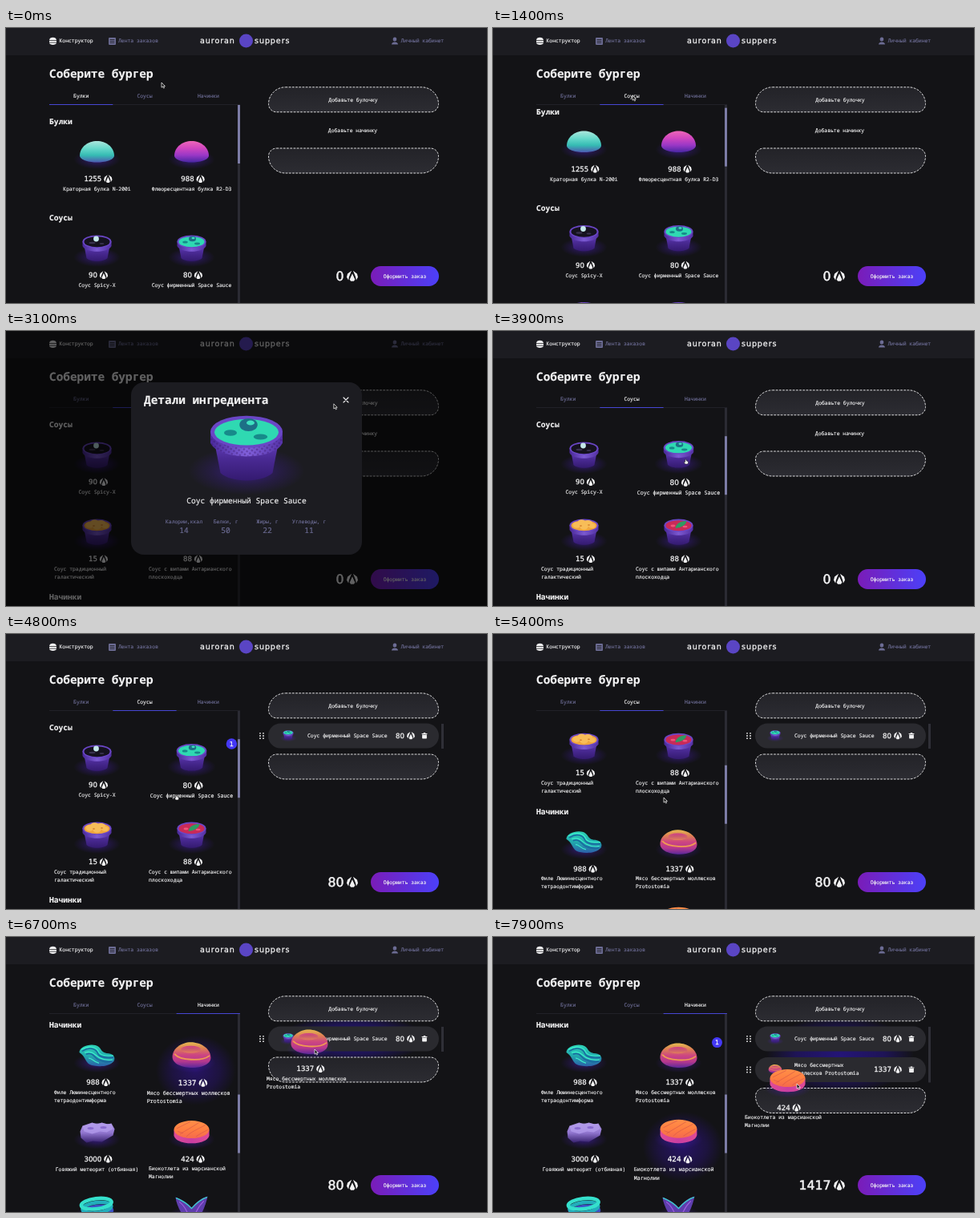
Animation, 600 px wide and 343 px high, one loop 8 s. Source, as an HTML page:

```html
<!DOCTYPE html>
<html lang="ru">
<head>
<meta charset="utf-8">
<title>Конструктор</title>
<style>
html, body { margin: 0; width: 100%; height: 100%; overflow: hidden; background: #131316; }
svg { display: block; width: 100%; height: 100%; }
text {
  font-family: "Noto Sans Mono", "DejaVu Sans Mono", monospace; text-rendering: geometricPrecision; white-space: pre;
  fill: currentColor; stroke: currentColor; stroke-width: .16px;
}
.num, .brand { font-family: "DejaVu Sans", sans-serif; }
.num { stroke-width: .035em; }
.brand { letter-spacing: .9px; stroke-width: .3px; }
</style>
</head>
<body>
<svg id="stage" viewBox="0 0 600 343" preserveAspectRatio="none"></svg>
<script>
const LOOP = 8000, STEP = 100;
const WHITE = '#f2f2f3', MUTED = '#6c6c94';

// ---- markup helpers ----
const text = (x, mid, str, o = {}) => {
  const size = o.size || 6.4;
  return `<text x="${x}" y="${mid + size * .35}" font-size="${size}" color="${o.color || WHITE}"
    text-anchor="${o.anchor || 'start'}" font-weight="${o.weight || 400}" ${o.attr || ''}>${str}</text>`;
};
const num = (x, mid, str, size = 8.6, attr = '') =>
  `<text class="num" x="${x}" y="${mid + size * .365}" font-size="${size}" color="${WHITE}" text-anchor="end" ${attr}>${str}</text>`;
const group = (x, y, inner, scale = 1) => `<g transform="translate(${x} ${y}) scale(${scale})">${inner}</g>`;
const oval = (x, y, rx, ry, fill, attr = '') => `<ellipse cx="${x}" cy="${y}" rx="${rx}" ry="${ry}" fill="${fill}" ${attr}/>`;
const shape = (d, fill, attr = '') => `<path d="${d}" fill="${fill}" ${attr}/>`;
const line = (d, stroke, width) => `<path d="${d}" fill="none" stroke="${stroke}" stroke-width="${width}" stroke-linecap="round"/>`;
const rect = (x, y, w, h, fill, attr = '') => `<rect x="${x}" y="${y}" width="${w}" height="${h}" fill="${fill}" ${attr}/>`;
const stops = colors => colors.map((c, i) => `<stop offset="${i / (colors.length - 1)}" stop-color="${c}"/>`).join('');
const linear = (id, colors, across) =>
  `<linearGradient id="${id}" x2="${across ? 1 : 0}" y2="${across ? 0 : 1}">${stops(colors)}</linearGradient>`;
const halo = (id, color, a, b) => `<radialGradient id="${id}"><stop offset="0" stop-color="${color}" stop-opacity="${a}"/>
  <stop offset=".6" stop-color="${color}" stop-opacity="${b}"/><stop offset="1" stop-color="${color}" stop-opacity="0"/></radialGradient>`;

const defs = `<defs>
  ${linear('mint', ['#b8fbe8', '#6eeed6', '#35cdbb', '#4f62b8'])}
  ${linear('pink', ['#ff6fc0', '#e04bc8', '#a33bd0', '#4a28a8'])}
  ${linear('pot', ['#6a43c6', '#4a2a94', '#341a70'])}
  ${linear('rim', ['#4a2a9c', '#8160dc', '#5533a8'], true)}
  ${linear('teal', ['#2ce6c0', '#1fb8b4', '#2a68b0'])}
  ${linear('meat', ['#f5c84e', '#ee8a52', '#dc4a84', '#c23c92', '#5e2aa0'])}
  ${linear('dimple', ['#c83c86', '#f08a58'])}
  ${linear('stone', ['#b9a2ee', '#9a80da', '#36226e'])}
  ${linear('cutlet', ['#ff8f48', '#ff7f42', '#f5694e'])}
  ${linear('crust', ['#f0509a', '#d842a8', '#f0509a'], true)}
  ${linear('button', ['#7a1cb8', '#4c40f8'], true)}
  ${linear('slot', ['#232328', '#2c2c32'])}
  ${halo('shade', '#4b1fc0', .6, .2)}
  ${halo('source', '#3a14b4', .5, .26)}
  ${halo('drop', '#3216c8', .55, .36)}
  <pattern id="dots" width="1.8" height="1.8" patternUnits="userSpaceOnUse" patternTransform="rotate(35)">
    <circle cx=".9" cy=".9" r=".5" fill="#3a1466" fill-opacity=".42"/></pattern>
  <clipPath id="listArea"><rect y="97" width="300" height="246"/></clipPath>
</defs>`;

// ---- food pictures, centred on 0,0 ----
const floor = (y = 9) => oval(0, y, 29, 12, 'url(#shade)');
const solid = (d, fill) => shape(d, fill) + shape(d, 'url(#dots)');
const bun = fill => floor() + solid('M-21.5 4C-21-7-11-14 0-14S21-7 21.5 4C21.5 10 9 12.5 0 12.5S-21.5 10-21.5 4Z', fill);
const pot = (fill, extra) => floor(11) +
  shape('M-16.5-6L-13 12C-8 17 8 17 13 12L16.5-6Z', 'url(#pot)') +
  solid('M-18-9V-3C-14 6 14 6 18-3V-9Z', 'url(#rim)') +
  oval(0, -8.5, 18, 8, '#6a46c6') + oval(0, -8.3, 16, 6.5, fill) + extra;

const art = {
  mintBun: bun('url(#mint)'),
  pinkBun: bun('url(#pink)'),
  spicy: pot('#15121f', oval(-6, -7, 4, 1.2, '#39324e') + oval(6, -6, 3, 1, '#39324e') + oval(-1, -12, 3.4, 3.4, '#c4e8ea')),
  space: pot('#2fd9b2', oval(-8, -8, 3.2, 1.5, '#178a8a') + oval(7, -6, 3.5, 1.4, '#178a8a') +
    oval(1, -12, 4.5, 3.2, '#1d6f86') + oval(2, -13, 2, 1.2, '#3fe0c0')),
  classic: pot('#f0a63c', [[-9, -9, 5], [-3, -12, 5], [5, -11, 5.5], [10, -8, 4], [0, -7, 5]]
    .map(([x, y, r]) => oval(x, y, r, r * .75, '#f8bd58')).join('') + oval(-4, -8, 1.5, .8, '#d07a2c') + oval(6, -9, 1.5, .8, '#d07a2c')),
  spiky: pot('#c92a58', oval(-7, -8, 3, 1.4, '#f0567a') + oval(8, -7, 3, 1.3, '#f0567a') +
    shape('M-4-5C-3-12 4-14 10-14C9-9 4-6-4-5Z', '#2f9a62')),
  fillet: floor() + solid('M-22-4C-22-11-10-15-2-13C6-11 4-4 12-3C19-3 24 1 21 7C14 15-2 14-9 11C-15 8-14 1-22-4Z', 'url(#teal)') +
    line('M-18-6C-8-12-1-8 1-3S12 3 20 2M-13-2C-5-5-3 3 2 5S12 9 18 7', '#1a6aa0', 1.6) +
    line('M-19-8C-8-14 0-10 2-5S12 0 20 0M-15-4C-5-7-2 0 3 2.5S12 6 19 5M-10 3C-6 3-4 8 2 9', '#3cf0cc', 1.2),
  ring: floor() + solid('M-23 2C-23-8-12-15.5-1-15.5C12-15.5 23-7 23 3C23 11 12 15 1 15S-23 11-23 2Z', 'url(#meat)') +
    oval(-1, -7, 12, 4.2, 'url(#dimple)') + line('M-20-1C-14 6 12 8 21 1', '#f09a52', 1.8) +
    shape('M-13-6C-9-2 7-2 11-6C8-10-10-10-13-6Z', 'url(#dots)'),
  stone: floor() + solid('M-21-1L-18-8L-12-10L-6-12L0-10L6-12L13-10L18-11L22-4L20 4L13 8L6 12L-5 11L-13 13L-20 7Z', 'url(#stone)') +
    shape('M-18-7L-6-11L6-11L18-10L20-4L12 0L4-1L-6 2L-16-1Z', '#b39cec', 'opacity=".75"') +
    oval(-8, -5, 4, 1.6, '#8a6cd0') + oval(8, -6, 4, 1.5, '#8a6cd0'),
  cutlet: floor() + solid('M-22-3V4C-20 17 20 17 22 4V-3Z', 'url(#crust)') + oval(0, -3.5, 22, 11, 'url(#cutlet)') +
    line('M-18-5L-2-13M-14 2C-8-2 0-6 9-12M-6 5C-2 0 8-4 17-9M6 5C10 2 16-1 20-3M-17-1L-11 1', '#d95a48', .7),
  hoops: floor() + `<g fill="none" stroke-width="4.6" transform="rotate(-7)">${[['#3c50c4', 4, 18], ['#22aebc', -1, 18], ['#35e0cc', -6, 19]]
    .map(([c, y, r]) => `<ellipse cy="${y}" rx="${r}" ry="6.5" stroke="${c}"/>`).join('')}</g>`,
  fin: floor() + solid('M-20-14C-14-12-5-7 0-1C6-8 12-13 20-15C18-6 14 6 8 12H-8C-14 5-19-5-20-14Z', '#6242b4') +
    line('M-19-13C-12-10-5-6 0 0C6-7 13-12 19-14', '#35d6c8', 1.2) + line('M-15-8C-10-4-6 2-4 9M15-9C10-4 6 2 4 9', '#a05ce0', 1.2)
};

const gem = shape('M-.7-4.8L-4.4-2L-5.2 1.2L-3.6 4L-3 1ZM.7-4.8L4.4-2L5.2 1.2L3.6 4L3 1ZM0-2.2L2.5 3.4L1.4 4.9H-1.4L-2.5 3.4Z', WHITE);

// ---- menu: column, price line, picture, price, name ----
const COLS = [113.5, 231.5];
const cards = [
  [0, 188, 'mintBun', 1255, ['Краторная булка N-200i']],
  [1, 188, 'pinkBun', 988, ['Флюоресцентная булка R2-D3']],
  [0, 308, 'spicy', 90, ['Соус Spicy-X']],
  [1, 308, 'space', 80, ['Соус фирменный Space Sauce']],
  [0, 404, 'classic', 15, ['Соус традиционный', 'галактический']],
  [1, 404, 'spiky', 88, ['Соус с шипами Антарианского', 'плоскоходца']],
  [0, 523.5, 'fillet', 988, ['Филе Люминесцентного', 'тетраодонтимформа']],
  [1, 523.5, 'ring', 1337, ['Мясо бессмертных моллюсков', 'Protostomia']],
  [0, 619, 'stone', 3000, ['Говяжий метеорит (отбивная)']],
  [1, 619, 'cutlet', 424, ['Биокотлета из марсианской', 'Магнолии']],
  [0, 714, 'hoops', '', []],
  [1, 714, 'fin', '', []]
].map(([col, y, pic, price, name]) => ({ x: COLS[col], y, pic, price, name }));
const SAUCE = 3, MEAT = 7, CUTLET = 9;

const cardBody = ({ pic, price, name }) => {
  const end = -5 + 2.7 * String(price).length;
  const label = name.length > 1
    ? name.map((s, i) => text(-53.5, 12.5 + i * 10, s)).join('')
    : name.map(s => text(0, 13, s, { anchor: 'middle' })).join('');
  return group(0, -33, art[pic]) + (price ? num(end, 0, price) + group(end + 8, 0, gem) : '') + label;
};
const badge = i => `<g id="badge${i}">${oval(48, -49.5, 6.5, 6.5, '#4438f5')}${num(50.4, -49.5, 1, 7.8)}</g>`;
const cardNode = (c, i) => `<g id="slot${i}">${oval(5, -15, 48, 42, 'url(#source)', `id="glow${i}"`)}
  <g id="card${i}">${cardBody(c)}</g>${i === SAUCE || i === MEAT ? badge(i) : ''}</g>`;

const heading = (y, s) => text(54, y, s, { size: 9.6, weight: 600 });
const list = `<g clip-path="url(#listArea)"><g id="scroll">
  ${heading(117, 'Булки')}${heading(237, 'Соусы')}${heading(452, 'Начинки')}${cards.map(cardNode).join('')}
</g></g>${rect(289, 96, 3, 247, '#2b2b33')}${rect(289, 96, 3, 73, '#7c7ca6', 'id="thumb"')}`;

// ---- fixed page parts ----
const header = rect(0, 0, 600, 34, '#1c1c21') +
  shape('M54 15.2C54 10.6 63 10.6 63 15.2ZM54 16H63V17.7H54ZM54 18.5H63C63 21.8 54 21.8 54 18.5Z', WHITE) +
  text(66.5, 16.2, 'Конструктор') +
  rect(128, 12, 9, 9, MUTED, 'rx="1"') + line('M130 14.5H135M130 16.5H135M130 18.5H135', '#1c1c21', .8) +
  text(140, 16.2, 'Лента заказов', { color: MUTED }) +
  text(242, 15.4, 'auroran', { size: 9.6, attr: 'class="brand"' }) + oval(299.5, 16, 8.5, 8.5, '#5a45c4') +
  text(310, 15.4, 'suppers', { size: 9.6, attr: 'class="brand"' }) +
  oval(485, 14, 2.3, 2.6, MUTED) + shape('M481 20.5C481 16.5 489 16.5 489 20.5Z', MUTED) +
  text(492.5, 16.2, 'Личный кабинет', { color: MUTED });

const tabs = text(54, 56.8, 'Соберите бургер', { size: 14.4, weight: 700 }) +
  ['Булки', 'Соусы', 'Начинки'].map((s, i) =>
    text(93.7 + i * 79.3, 85, s, { anchor: 'middle', attr: `id="tab${i}"` })).join('') +
  rect(54, 95.2, 238, .6, '#2b2b33') + rect(54, 95, 79.3, .9, '#4c4ce8', 'id="mark"');

const bunSlot = (y, a, b) => shape(`M${327.5 + a} ${y}H${539.5 - a}A${a} ${a} 0 0 1 539.5 ${y + a}
  A${b} ${b} 0 0 1 ${539.5 - b} ${y + 31}H${327.5 + b}A${b} ${b} 0 0 1 327.5 ${y + 31 - b}
  A${a} ${a} 0 0 1 ${327.5 + a} ${y}Z`, 'url(#slot)', `stroke="${WHITE}" stroke-width=".9" stroke-dasharray="2.8 1.4"`);
const grip = [0, 4].map(x => [-3.2, 0, 3.2].map(y => oval(x, y, .9, .9, WHITE)).join('')).join('');
const bin = shape('M-3.4-2.6H-1.2V-3.6H1.2V-2.6H3.4V-1.6H-3.4ZM-2.9-1H2.9V3C2.9 3.8 2.4 4 2 4H-2C-2.4 4-2.9 3.8-2.9 3Z', WHITE);
const row = (id, mid, pic, price, lines) => `<g id="${id}">${rect(327, mid - 15.5, 213, 31, '#2a2a2f', 'rx="15.5"')}
  ${group(317, mid, grip)}${group(352, mid - 1, art[pic], .36)}
  ${lines.map((s, i) => text(376, mid - .5 + (i - (lines.length - 1) / 2) * 9.6, s)).join('')}
  ${num(497, mid - .5, price)}${group(505, mid - .5, gem, .95)}${group(522, mid - .5, bin)}</g>`;

const order = oval(433, 127, 92, 30, 'url(#drop)', 'id="dropGlow"') +
  bunSlot(73.8, 21, 10) + text(433, 89.7, 'Добавьте булочку', { anchor: 'middle' }) +
  text(432.5, 127.3, 'Добавьте начинку', { anchor: 'middle', attr: 'id="hint"' }) +
  row('row0', 127, 'space', 80, ['Соус фирменный Space Sauce']) +
  row('row1', 165.5, 'ring', 1337, ['Мясо бессмертных', 'моллюсков Protostomia']) +
  `<g id="lower">${bunSlot(150, 10, 21)}</g>` + rect(543, 112, 3, 31, '#2f2f37', 'id="orderBar"') +
  num(421.5, 309.5, 0, 15.7, 'id="total"') + group(432, 309.2, gem, 1.35) +
  rect(455, 297, 85, 25, 'url(#button)', 'rx="12.5"') + text(497.5, 309.5, 'Оформить заказ', { anchor: 'middle' });

const facts = [['Калории,ккал', 14], ['Белки, г', 50], ['Жиры, г', 22], ['Углеводы, г', 11]];
const modal = `<g id="modal">${rect(0, 0, 600, 343, '#000', 'opacity=".6"')}${rect(156, 64, 288, 215, '#1c1c21', 'rx="16"')}
  ${text(172, 86, 'Детали ингредиента', { size: 14.4, weight: 700 })}${line('M421 83L427 89M427 83L421 89', WHITE, 1.1)}
  ${group(300, 147, art.space, 2.5)}${text(300, 212, 'Соус фирменный Space Sauce', { size: 9.6, anchor: 'middle' })}
  ${facts.map(([k, v], i) => text(222 + i * 52, 238, k, { anchor: 'middle', color: MUTED }) +
    text(222 + i * 52, 249, v, { size: 9.6, anchor: 'middle', color: MUTED })).join('')}</g>`;

const pointer = `<g id="pointer"><path id="arrow" d="M0 0V6.2L1.5 4.9L2.6 7.1L3.6 6.6L2.6 4.5H4.4Z" fill="#111" stroke="#fff" stroke-width=".7"/>
  <path id="hand" d="M-1-3C0-3.4.3-2 .4-1L2-.6C2.8-.3 2.6 2 1.8 3H-1.2C-2 2-2.8.8-2.6 0L-1.4.6Z" fill="#fff" stroke="#222" stroke-width=".6"/></g>`;

const $ = id => document.getElementById(id);
$('stage').innerHTML = defs + rect(0, 0, 600, 343, '#131316') + list + header + tabs + order + '<use id="ghost"/>' + modal + pointer;

// ---- motion: [time, ...values] ----
const cursorPath = [
  [0, 194, 68], [300, 194, 68], [900, 174, 84], [1500, 174, 84], [2200, 219, 151], [2600, 219, 151],
  [3200, 424, 86], [3450, 424, 86], [3850, 241, 163], [4000, 241, 163], [4350, 400, 128], [4450, 400, 128],
  [4800, 213, 204], [5900, 213, 204], [6250, 238, 157], [6350, 238, 157], [6700, 385, 140], [6950, 400, 132],
  [7400, 243, 247], [7500, 243, 247], [7900, 379, 183], [8000, 384, 178]
];
const END = 342.4;
const scrollPath = [[0, 0], [1300, 0], [1800, 120], [5000, 120], [5800, 341.6], [5900, END]];
const drags = [
  { card: SAUCE, from: 4000, to: 4500 },
  { card: MEAT, from: 6300, to: 7000 },
  { card: CUTLET, from: 7500, to: LOOP }
];

function along(path, t) {
  const i = path.findIndex(k => k[0] > t);
  if (i < 0) return path[path.length - 1].slice(1);
  const a = path[i - 1], b = path[i], p = (t - a[0]) / (b[0] - a[0]), e = p * p * (3 - 2 * p);
  return a.slice(1).map((v, j) => v + (b[j + 1] - v) * e);
}
const show = (id, on) => $(id).setAttribute('visibility', on ? 'visible' : 'hidden');
const move = (id, x, y, scale = '') => $(id).setAttribute('transform', `translate(${x} ${y}) ${scale}`);

function draw(t) {
  const [cx, cy] = along(cursorPath, t), [scroll] = along(scrollPath, t);
  const drag = drags.find(d => t >= d.from && t < d.to);
  const open = t >= 2600 && t < 3450;
  const count = (t >= 4500) + (t >= 7000);
  const tab = scroll >= END ? 2 : t >= 1300 ? 1 : 0;

  move('scroll', 0, -scroll);
  $('thumb').setAttribute('y', 96 + scroll * .2935);
  let onCard = false;
  cards.forEach((c, i) => {
    const dy = cy - (c.y - scroll);
    const under = !open && cy > 97 && Math.abs(cx - c.x) < 56 && dy > -62 && dy < 30;
    const hover = drag ? drag.card === i : under;
    onCard = onCard || under;
    move('slot' + i, c.x, c.y, hover ? 'translate(0 -14) scale(1.04) translate(0 14)' : '');
    show('glow' + i, drag && drag.card === i);
  });
  show('badge' + SAUCE, count > 0);
  show('badge' + MEAT, count > 1);

  for (let i = 0; i < 3; i++) $('tab' + i).setAttribute('color', i === tab ? WHITE : MUTED);
  $('mark').setAttribute('x', 54 + tab * 79.3);

  show('hint', !count);
  show('row0', count > 0);
  show('row1', count > 1);
  show('orderBar', count > 0);
  $('orderBar').setAttribute('height', count > 1 ? 69.5 : 31);
  move('lower', 0, count > 1 ? 38.5 : 0);
  $('total').textContent = [0, 80, 1417][count];
  show('dropGlow', drag && cx > 327);
  $('dropGlow').setAttribute('cy', count > 1 ? 147 : 127);
  $('dropGlow').setAttribute('ry', count > 1 ? 49 : 30);

  show('ghost', drag);
  if (drag) {
    const c = cards[drag.card], [sx, sy] = along(cursorPath, drag.from);
    $('ghost').setAttribute('href', '#card' + drag.card);
    move('ghost', c.x + cx - sx, c.y - scroll + cy - sy);
  }
  show('modal', open);
  move('pointer', cx, cy);
  show('hand', onCard && !drag);
  show('arrow', !onCard || drag);
}

const start = performance.now();
function tick() {
  const t = (performance.now() - start) % LOOP;
  draw(Math.floor(t / STEP) * STEP);
  requestAnimationFrame(tick);
}
tick();
</script>
</body>
</html>
```
